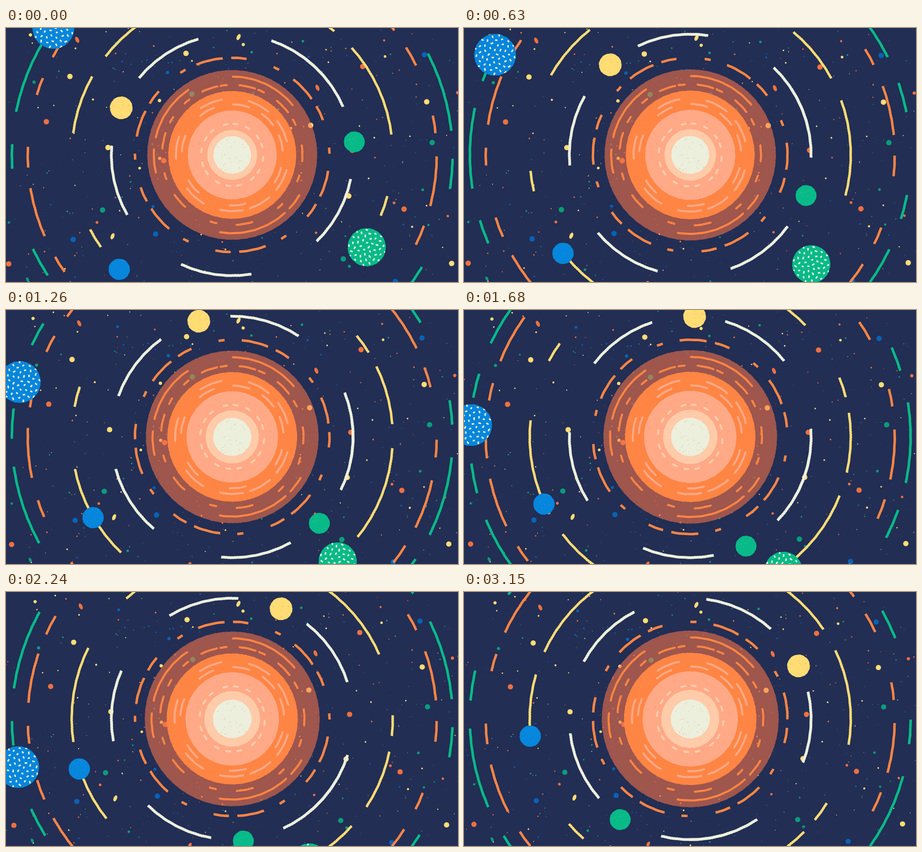
These frames come from a looping animation (997 by 561 pixels, 3220 ms). An HTML page with a canvas:

```html
<!DOCTYPE html>
<html lang="en">
<head>
<meta charset="utf-8">
<title>Orbits</title>
<style>
html, body { margin: 0; width: 100%; height: 100%; overflow: hidden; background: #222e54; }
canvas { display: block; width: 997px; height: 561px; }
</style>
</head>
<body>
<canvas id="stage" width="997" height="561"></canvas>
<script>
const ctx = document.getElementById('stage').getContext('2d');
const CX = 499, CY = 280.3, TAU = 2 * Math.PI;
const FRAME = 70, FRAMES = 46, STEP = 87.5;
const COLOR = {
  sky: '#222e54', cream: '#ecefdc', yellow: '#ffdc74', orange: '#ff8544',
  green: '#08ba88', blue: '#0686dc', pink: '#ffa987', peach: '#ffcba9'
};
const DUST = { yellow: '#ffdc74', orange: '#ee7040', green: '#0b9c7b', blue: '#0863b4' };
const tones = Object.values(DUST);

const rad = d => d * Math.PI / 180;
const times = (n, make) => Array.from({ length: n }, (_, i) => make(i));
const steady = v => k => k * v;
const cubic = (a, b, c) => k => k * (a + k * (b + k * c));

function seeded(seed) {
  return () => {
    seed = (seed + 0x6D2B79F5) | 0;
    let v = Math.imul(seed ^ seed >>> 15, 1 | seed);
    v = v + Math.imul(v ^ v >>> 7, 61 | v) ^ v;
    return ((v ^ v >>> 14) >>> 0) / 4294967296;
  };
}

// Small wobble for a hand-cut edge
const rough = a => 0.25 * Math.sin(a * 1.9) + 0.2 * Math.sin(a * 3.3 + 1);

function disc(x, y, r, color) {
  const n = Math.max(24, Math.round(r * 2));
  ctx.beginPath();
  for (let i = 0; i < n; i++) {
    const a = i / n * TAU, d = r + rough(i * 2.2);
    ctx.lineTo(x + d * Math.cos(a), y + d * Math.sin(a));
  }
  ctx.fillStyle = color;
  ctx.fill();
}

function speck(x, y, w, h, angle, color) {
  ctx.beginPath();
  ctx.ellipse(x, y, w, h, angle, 0, TAU);
  ctx.fillStyle = color;
  ctx.fill();
}

function arc(r, from, len, width, color, cap = 'butt') {
  const n = Math.max(3, Math.round(r * rad(len) / 3));
  ctx.beginPath();
  for (let i = 0; i <= n; i++) {
    const a = rad(from + len * i / n), d = r + rough(i * 1.7 + r);
    ctx.lineTo(CX + d * Math.cos(a), CY + d * Math.sin(a));
  }
  ctx.strokeStyle = color;
  ctx.lineWidth = width;
  ctx.lineCap = cap;
  ctx.lineJoin = 'round';
  ctx.stroke();
}

// n dashes of equal length, each one period after the last
const series = (from, len, period, n) => times(n, j => [from + j * period, len]);

const rings = [
  { r: 486, width: 5.6, color: COLOR.green, turn: steady(-2.87), dashes: [
    ...series(259.7, 21.1, 72.9, 5), ...series(288.1, 7.9, 72.9, 5), ...series(244.8, 6.4, 72.9, 5)] },
  { r: 451, width: 5.4, color: COLOR.orange, turn: steady(-2.87), dashes: [
    ...series(256.3, 14.1, 52.05, 7), ...series(276.2, 5.8, 52.05, 7), ...series(244.8, 5, 52.05, 7)] },
  { r: 354, width: 5.4, color: COLOR.yellow, turn: cubic(2.933, 0.03517, -0.000737), dashes: [
    ...series(14.9, 7.4, 130, 3),
    ...[57.8, 187.8, 288].flatMap(a => [[a, 21.5], [a + 30.1, 34.6]])] },
  { r: 266.5, width: 6, color: COLOR.cream, turn: steady(3.54), dashes: [
    ...series(11.5, 34.2, 69.35, 5), [302, 34.5]] },
  { r: 214.5, width: 5.4, color: COLOR.orange, turn: steady(-2.378), dashes: [
    ...series(248.4, 16, 60.5, 6), ...series(269.4, 9.1, 60.5, 6), ...series(295.2, 3.6, 60.5, 6)] }
];

const planets = [
  { orbit: 266, at: 203, size: 25, color: COLOR.yellow, turn: steady(3.636), grit: '#e0a850' },
  { orbit: 270.8, at: -6.1, size: 23, color: COLOR.green, turn: steady(3.636), grit: '#3bc79c' },
  { orbit: 355, at: 134.6, size: 23.5, color: COLOR.blue, turn: steady(1.09), grit: '#2f97de' },
  { orbit: 360, at: 34.5, size: 42, color: COLOR.green, turn: steady(1.09), spots: 44 },
  { orbit: 484, at: 215.4, size: 46, color: COLOR.blue, turn: cubic(-0.812, -0.0539, 0.000377), spots: 48 }
];

// Dashes on the sun: [start, length]
const flareOuter = [[270.5, 50], [193, 43], [167, 17], [48, 51], [31, 12]];
const flareInner = times(16, i =>
  [22.5 * i + 10 + 18 * Math.cos((i - 7.5) * 0.4), i * 7 % 16 < 7 ? 13 : 5]);
const glowOuter = times(8, i => [45 * i + 1 + 16 * Math.cos(i + 0.4), 23]);
const glowInner = times(8, i => [45 * i + 15 + 36 * Math.sin(i * 0.42), 18]);
const embers = times(16, i => [i * 22.5 + 4 + 3 * Math.sin(i * 2.4), 7]);

// The largest grains; all others are scattered by chance
const grains = {
  yellow: [[141, 107], [397, 56], [672, 215], [928, 163], [225, 264], [756, 371], [983, 520]],
  orange: [[89, 207], [787, 85], [878, 400], [6, 521], [764, 270], [348, 293]],
  green: [[213, 402], [410, 146], [744, 510], [940, 253]],
  blue: [[330, 455], [923, 59], [148, 467], [859, 560]]
};
const dust = (() => {
  const rnd = seeded(41);
  const scatter = (n, size, flat) => times(n, () => {
    const w = size(rnd());
    return {
      x: -20 + rnd() * 1037, y: -14 + rnd() * 589, w, h: w * flat,
      angle: rnd() - 0.5, color: tones[Math.floor(rnd() * 4)]
    };
  });
  const large = Object.keys(grains).flatMap(name =>
    grains[name].map(([x, y]) => ({ x, y, w: 6, h: 6, angle: 0, color: DUST[name] })));
  const streaks = [['yellow', 513, 20, 0.45], ['yellow', 235, 460, 0.4], ['orange', 157, 26, -0.45], ['orange', 687, 132, -0.4]]
    .map(([name, x, y, angle]) => ({ x, y, w: 3.9, h: 7.2, angle, color: DUST[name] }));
  return [
    ...scatter(380, u => 0.6 + 1.4 * u * u, 1),
    ...scatter(34, u => 2.3 + 1.7 * u, 1),
    ...scatter(6, u => 3 + u, 1.7),
    ...large, ...streaks
  ];
})();

// The dust field slowly recedes towards the centre
function drawDust(p) {
  const s = 1 - 0.0325 * p;
  ctx.save();
  ctx.translate(CX, CY);
  ctx.scale(s, s);
  ctx.translate(-CX, -CY);
  for (const d of dust) speck(d.x, d.y, d.w, d.h, d.angle, d.color);
  ctx.restore();
}

function grit(x, y, r, n, seed, color) {
  const rnd = seeded(seed);
  ctx.fillStyle = color;
  for (let i = 0; i < n; i++) {
    const a = rnd() * TAU, d = r * Math.sqrt(rnd()) * 0.97, s = 0.7 + rnd() * 1.1;
    ctx.fillRect(x + d * Math.cos(a), y + d * Math.sin(a), s, s);
  }
}

function drawSun(p) {
  const grow = (a, b) => a + (b - a) * p;
  const halo = grow(187.3, 195), body = grow(141, 146), warm = grow(98, 105);
  const dashes = (list, r, color) => {
    for (const [from, len] of list) arc(r, from, len, 4.5, color, 'round');
  };
  disc(CX, CY, halo, 'rgba(255,119,72,0.56)');
  dashes(flareOuter, halo * 0.923, COLOR.orange);
  dashes(flareInner, halo * 0.826, COLOR.orange);
  disc(CX, CY, body, COLOR.orange);
  grit(CX, CY, body, 70, 5, '#f5a35c');
  dashes(glowOuter, body * 0.88, COLOR.pink);
  dashes(glowInner, body * 0.792, COLOR.pink);
  disc(CX, CY, warm, COLOR.pink);
  grit(CX, CY, warm, 45, 9, '#e98c68');
  dashes(embers, warm * 0.7, COLOR.peach);
  disc(CX, CY, grow(55, 64), COLOR.peach);
  disc(CX, CY, grow(41.3, 43), COLOR.cream);
  grit(CX, CY, 41, 38, 13, '#d5b795');
}

function drawSpots(size, n, rnd) {
  ctx.beginPath();
  ctx.arc(0, 0, size, 0, TAU);
  ctx.clip();
  ctx.beginPath();
  for (let i = 0; i < n; i++) {
    const d = size * Math.sqrt((i + 0.5) / n), g = i * 2.39996;
    const tilt = rnd() * Math.PI, h = 2.2 + rnd() * 0.9;
    const x = d * Math.cos(g), y = d * Math.sin(g);
    const dx = h * Math.cos(tilt), dy = h * Math.sin(tilt);
    ctx.moveTo(x - dx, y - dy);
    ctx.lineTo(x + dx, y + dy);
  }
  ctx.lineCap = 'butt';
  ctx.lineWidth = 3.3;
  ctx.strokeStyle = COLOR.cream;
  ctx.stroke();
}

function drawPlanet(p, k, seed) {
  const turn = p.turn(k), a = rad(p.at + turn);
  const x = CX + p.orbit * Math.cos(a), y = CY + p.orbit * Math.sin(a);
  disc(x, y, p.size, p.color);
  if (p.grit) grit(x, y, p.size, 16, seed, p.grit);
  if (p.spots) {
    ctx.save();
    ctx.translate(x, y);
    ctx.rotate(rad(turn));
    drawSpots(p.size, p.spots, seeded(seed));
    ctx.restore();
  }
}

function draw(frame) {
  const t = frame * FRAME, p = t / 3150;
  const k = Math.floor(t / STEP); // orbits move in slower steps than the dust
  ctx.fillStyle = COLOR.sky;
  ctx.fillRect(0, 0, 997, 561);
  drawDust(p);
  drawSun(p);
  for (const ring of rings) {
    const turn = ring.turn(k);
    for (const [from, len] of ring.dashes) arc(ring.r, from + turn, len, ring.width, ring.color);
  }
  planets.forEach((planet, i) => drawPlanet(planet, k, 70 + i));
}

const start = performance.now();
function tick() {
  const t = Math.max(0, performance.now() - start);
  draw(Math.floor(t / FRAME) % FRAMES);
  requestAnimationFrame(tick);
}
tick();
</script>
</body>
</html>
```
